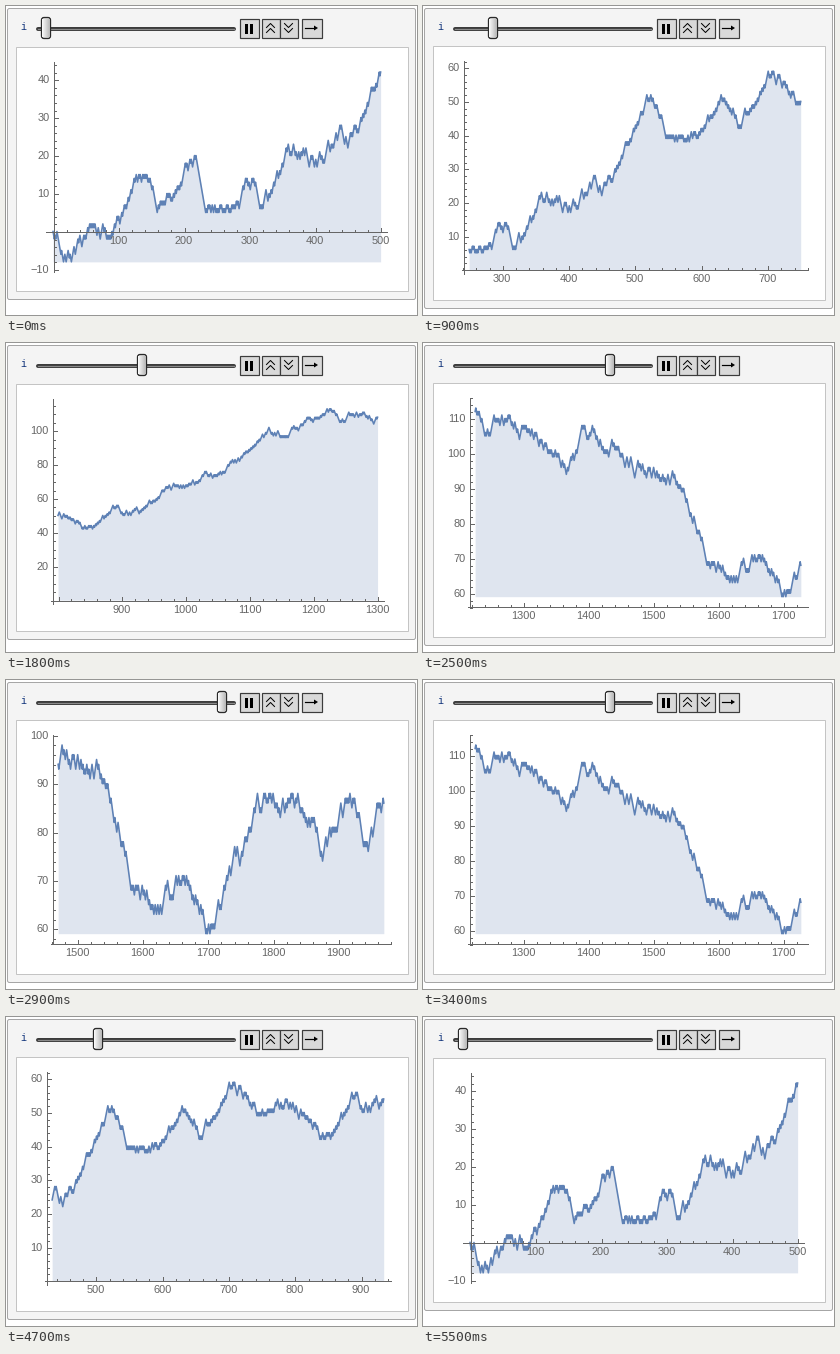
A matplotlib script that plays this animation: 411x309 px, repeating every 6000 ms.

```python
import math
import random

import numpy as np
import matplotlib.pyplot as plt
from matplotlib.animation import FuncAnimation
from matplotlib.patches import FancyBboxPatch, Polygon, Rectangle

WIDTH, HEIGHT, DPI = 411, 309, 64
PT = 72 / DPI                      # points per pixel
SPAN = 500                         # samples in the visible window
PEAK = 25                          # last position of the sweep
SPEED = 61                         # samples per position
DIGIT = 6.12                       # width of a digit in a label
GREY, BLUE, FILL = "#666666", "#5e81b5", "#dfe5ef"

# Main highs and lows of the random walk.
TURNS = [
    (16, -8), (58, 2), (82, -2), (123, 13), (141, 15), (159, 5), (200, 16),
    (218, 20), (231, 7), (271, 5), (304, 14), (316, 6), (359, 23), (399, 17),
    (440, 28), (450, 22), (518, 52), (546, 40), (582, 38), (630, 52),
    (656, 42), (701, 59), (743, 49), (774, 54), (844, 42), (886, 56),
    (914, 50), (962, 64), (1064, 78), (1130, 102), (1148, 96), (1221, 113),
    (1241, 105), (1255, 111), (1337, 101), (1366, 94), (1390, 108),
    (1489, 93), (1500, 96), (1537, 91), (1581, 69), (1617, 63), (1655, 71),
    (1699, 59), (1725, 69),
]


def bridge(y, goal, n, rng):
    """Walk from y to goal in n unit steps, wandering about a straight line."""
    lo, hi = min(y, goal), max(y, goal)
    slope = (goal - y) / n
    for left in range(n, 0, -1):
        gap = goal - y
        drift = y - (goal - slope * left)
        if abs(gap) >= left:
            y += 1 if gap > 0 else -1
        elif y >= hi or drift > 2:
            y -= 1
        elif y <= lo or drift < -2:
            y += 1
        else:
            y += rng.choice((-1, 1))
        yield y


def make_walk():
    rng = random.Random(4)
    walk = [0]
    for x, y in TURNS:
        walk += bridge(walk[-1], y, x - len(walk) + 1, rng)
    while len(walk) < 2010:
        y = walk[-1]
        walk.append(y + (-1 if y >= 88 else 1 if y <= 61 else rng.choice((-1, 1))))
    return np.array(walk)


WALK = make_walk()

fig = plt.figure(figsize=(WIDTH / DPI, HEIGHT / DPI), dpi=DPI, facecolor="white")
ax = fig.add_axes([0, 0, 1, 1])


def crisp(v):
    return math.floor(v) + 0.5


def line(xs, ys, color="black", w=1.0, aa=True, **kw):
    ax.plot(xs, ys, color=color, lw=w * PT, antialiased=aa, **kw)


def box(x0, y0, x1, y1, face, edge, radius=0.0, w=1.0, z=1):
    """Box whose border covers columns x0..x1 and rows y0..y1."""
    ax.add_patch(FancyBboxPatch(
        (x0 + 0.5, y0 + 0.5), x1 - x0, y1 - y0, fc=face, ec=edge, lw=w * PT, zorder=z,
        boxstyle=f"round,pad=0,rounding_size={radius}" if radius else "square,pad=0"))


def bar(x, y, w, h, color, z=1):
    ax.add_patch(Rectangle((x, y), w, h, fc=color, lw=0, zorder=z))


def label(x, y, s, ha):
    ax.text(x, y, s, ha=ha, va="center", color=GREY,
            fontsize=11 * PT, family="Liberation Sans")


def ticks(lo, hi, step):
    return [n * step for n in range(math.ceil(lo / step), math.floor(hi / step) + 1)]


def text_width(v):
    return DIGIT * len(str(abs(v))) + (6.4 if v < 0 else 0)


def draw_controls(start):
    ax.text(17.5, 20.5, "i", ha="center", va="center", color="#0b2f78",
            fontsize=10 * PT, family="Liberation Mono")
    line([32, 228], [22.5, 22.5], "#3c3c3c", 4, solid_capstyle="round")
    line([32, 228], [22.5, 22.5], "#8a8a8a", 1.2)

    x = round(40 + 0.12 * start)
    box(x - 5, 11, x + 4, 32, "#dcdcdc", "#2a2a2a", 2.5, 1.3, z=3)
    for j in range(8):
        bar(x - 4 + j, 13, 1, 18, str(0.97 - 0.035 * j), z=4)

    for x0, x1 in ((233, 252), (255, 273), (273, 291), (295, 315)):
        box(x0, 12, x1, 31, "#d9d9d9", "#3c3c3c", w=1.2)
    for x0 in (239, 244):
        bar(x0, 17.5, 2.6, 10, "black")
    for cx, d in ((264.5, -1), (282.5, 1)):
        for cy in (19.5, 24.5):
            line([cx - 4, cx, cx + 4], [cy - 2 * d, cy + 2 * d, cy - 2 * d])
    line([299, 309], [22, 22], w=1.2)
    ax.add_patch(Polygon([(308, 19.5), (312, 22), (308, 24.5)], fc="black", lw=0))


def draw(n):
    k = max(0, min(n - 4, PEAK, 55 - n))
    start = max(0, round(1501 - SPEED * (PEAK + 0.5 - k)))
    xs = np.arange(start, start + SPAN + 1)
    data = WALK[xs]

    # Value ranges: the vertical one reaches down to zero when that is near.
    low, high = int(data.min()), int(data.max())
    from_zero = 0 <= low < 0.5 * high
    base = 0 if from_zero else low
    below = 0.02 if from_zero else 0.05
    total = (high - base) / (0.95 - below)
    y_lo, y_hi = base - below * total, high + 0.05 * total
    x_range = SPAN / 0.96
    x_lo = start - 0.02 * x_range
    x_hi = x_lo + x_range

    step = next(s for s in (5, 10, 20, 50) if total / s <= 7)
    minor = {5: 1, 10: 2, 20: 5, 50: 10}[step]
    y_major = [v for v in ticks(y_lo, y_hi, step) if v != 0]
    # Labels too close to the vertical axis are dropped.
    x_major = ticks(max(x_lo, 0) + 0.03 * x_range, x_hi, 100)

    # The plot is as wide as its labels allow, with a golden aspect.
    at_zero = x_lo < 0
    frac0 = -x_lo / x_range if at_zero else 0
    edge = max(map(text_width, y_major)) + (28.4 if at_zero else 27)
    last = (x_major[-1] - x_lo) / x_range
    room = 383.8 - text_width(x_major[-1]) / 2 - edge
    w = min((384.6 - edge) / (1 - frac0), room / (last - frac0))
    h = w / 1.618
    left = edge - frac0 * w
    axis_x = crisp(edge if at_zero else edge + 1)

    frac_y = y_hi / total if y_lo < 0 else 1 - 0.7 / h
    content = max(frac_y * h + 29.6, h + 18)
    top = 55.5 if content < 234 else 54.5
    bottom = round(top + content)
    axis_y = crisp(top + frac_y * h)

    def px(v):
        return left + (v - x_lo) / x_range * w

    def py(v):
        return top + (y_hi - v) / total * h

    ax.clear()
    ax.set_axis_off()
    ax.set_xlim(0, WIDTH)
    ax.set_ylim(HEIGHT, 0)

    box(1, 2, 409, bottom + 9, "#f4f4f4", "#a6a6a6", 2)
    box(9, round(top - 15.4), 401, bottom, "white", "#c4c4c4")
    draw_controls(start)

    ax.fill_between(px(xs), py(data), py(base), color=FILL, lw=0)
    line(px(xs), py(data), BLUE, 1.6, solid_joinstyle="round")

    line([left, left + w], [axis_y] * 2, GREY, aa=False)
    line([axis_x] * 2, [top, top + h], GREY, aa=False)
    for v in ticks(x_lo, x_hi, 20):
        x = crisp(px(v))
        line([x, x], [axis_y, axis_y - (4 if v % 100 == 0 else 2)], GREY, aa=False)
    for v in ticks(y_lo, y_hi, minor):
        y = crisp(py(v))
        line([axis_x, axis_x + (4 if v % step == 0 else 2)], [y, y], GREY, aa=False)
    for v in x_major:
        label(px(v), axis_y + 9.5, str(v), "center")
    for v in y_major:
        label(axis_x - 4, py(v) + 0.6, str(v).replace("-", "\u2212"), "right")
    return []


anim = FuncAnimation(fig, draw, frames=60, interval=100, repeat=True,
                     repeat_delay=0, blit=False)
plt.show()
```
